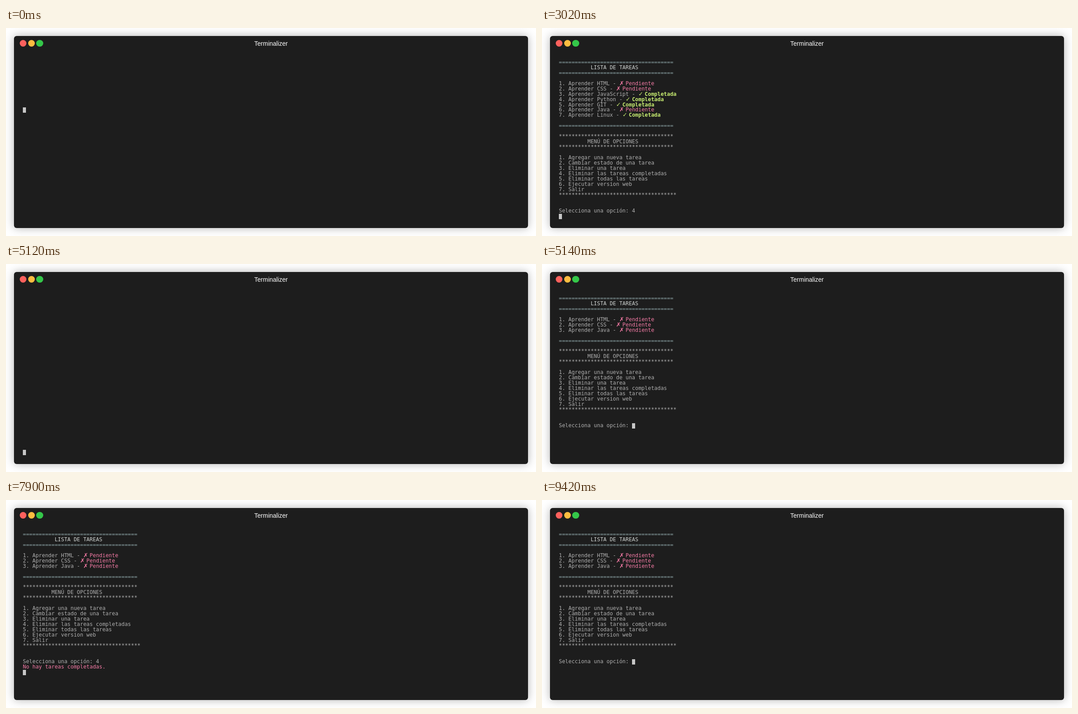
Recreate the animation shown at these times as an HTML page. Size 1195x469 px, loop 9500 ms.

```html
<!DOCTYPE html>
<html lang="es">
<head>
<meta charset="utf-8">
<title>Lista de tareas</title>
<style>
  html, body { margin: 0; width: 100%; height: 100%; overflow: hidden; background: #fff; }
  .window {
    position: absolute; left: 18px; top: 18px; width: 1159px; height: 433px;
    border-radius: 6px; background: #1d1d1d; box-shadow: 0 0 20px rgba(0, 0, 0, .3);
  }
  .dot { position: absolute; top: 8.75px; width: 15.5px; height: 15.5px; border-radius: 50%; }
  .title {
    position: absolute; top: 8px; width: 100%; text-align: center; color: #fff;
    font: 14px/18px "Liberation Sans", Arial, sans-serif;
  }
  #screen {
    position: absolute; left: 20px; top: 53.75px; color: #afafaf; white-space: pre;
    font: 11.92px/11.97px "DejaVu Sans Mono", monospace;
  }
  #screen div { height: 11.97px; }
  .rule { color: #849a9c; }
  .head { color: #d0d4d2; }
  .bad { color: #f57ba6; }
  .good { color: #c8ed71; font-weight: bold; }
  /* The mark takes one cell and spills into the next. */
  .mark { display: inline-block; width: 7.176px; font: 13px/0 "DejaVu Sans", sans-serif; }
  .good .mark { font-weight: bold; }
  #cursor { position: absolute; width: 7.2px; height: 11.97px; background: #c7c7c7; }
</style>
</head>
<body>
<div class="window">
  <div class="dot" style="left:12.75px;background:#fc615d"></div>
  <div class="dot" style="left:31.5px;background:#fdbc40"></div>
  <div class="dot" style="left:50.25px;background:#34c749"></div>
  <div class="title">Terminalizer</div>
  <div id="screen"></div>
  <div id="cursor"></div>
</div>
<script>
const ROWS = 30, CELL_W = 7.176, CELL_H = 11.97, LOOP = 9500;
const screenEl = document.getElementById('screen');
const cursorEl = document.getElementById('cursor');
const span = (cls, text) => `<span class="${cls}">${text}</span>`;
const status = (cls, mark, text) => span(cls, `${span('mark', mark)} ${text}`);

const tasks = [
  ['HTML', false], ['CSS', false], ['JavaScript', true], ['Python', true],
  ['GIT', true], ['Java', false], ['Linux', true]
];
const pending = tasks.filter(([, done]) => !done);
const options = [
  'Agregar una nueva tarea', 'Cambiar estado de una tarea', 'Eliminar una tarea',
  'Eliminar las tareas completadas', 'Eliminar todas las tareas',
  'Ejecutar version web', 'Salir'
];
const PROMPT = 'Selecciona una opción: ';

function menu(list, answer = '') {
  const rule = span('rule', '='.repeat(36)), stars = '*'.repeat(36);
  return [
    rule, span('head', ' '.repeat(10) + 'LISTA DE TAREAS'), rule, '',
    ...list.map(([name, done], i) => `${i + 1}. Aprender ${name} - ` +
      (done ? status('good', '✓', 'Completada') : status('bad', '✗', 'Pendiente'))),
    '', rule, '',
    stars, ' '.repeat(9) + 'MENÚ DE OPCIONES', stars, '',
    ...options.map((text, i) => `${i + 1}. ${text}`),
    stars + '*', '', '', PROMPT + answer
  ];
}

const cleared = row => ({ lines: [], row, col: 0 });

function prompt(list, answer = '') {
  const lines = menu(list, answer);
  return { lines, row: lines.length - 1, col: PROMPT.length + answer.length };
}

// Lines after Enter; the top scrolls away when the screen is full.
function entered(list, ...output) {
  const lines = [...menu(list, '4'), ...output, ''].slice(-ROWS);
  return { lines, row: lines.length - 1, col: 0 };
}

const steps = [
  [0, cleared(9)],
  [20, prompt(tasks)],
  [1020, prompt(tasks, '4')],
  [3020, entered(tasks)],
  [3120, entered(tasks, span('good', 'Tareas completadas eliminadas.'))],
  [5120, cleared(29)],
  [5140, prompt(pending)],
  [7140, prompt(pending, '4')],
  [7800, entered(pending)],
  [7900, entered(pending, span('bad', 'No hay tareas completadas.'))],
  [9400, cleared(26)],
  [9420, prompt(pending)]
];

let shown;
function draw(time) {
  const [, state] = steps.findLast(([start]) => start <= time);
  if (state === shown) return;
  shown = state;
  screenEl.innerHTML = state.lines.map(line => `<div>${line}</div>`).join('');
  cursorEl.style.left = 20 + state.col * CELL_W + 'px';
  cursorEl.style.top = 53.75 + state.row * CELL_H + 'px';
}

const begin = performance.now();
function tick() {
  draw((performance.now() - begin) % LOOP);
  requestAnimationFrame(tick);
}
tick();
</script>
</body>
</html>
```
